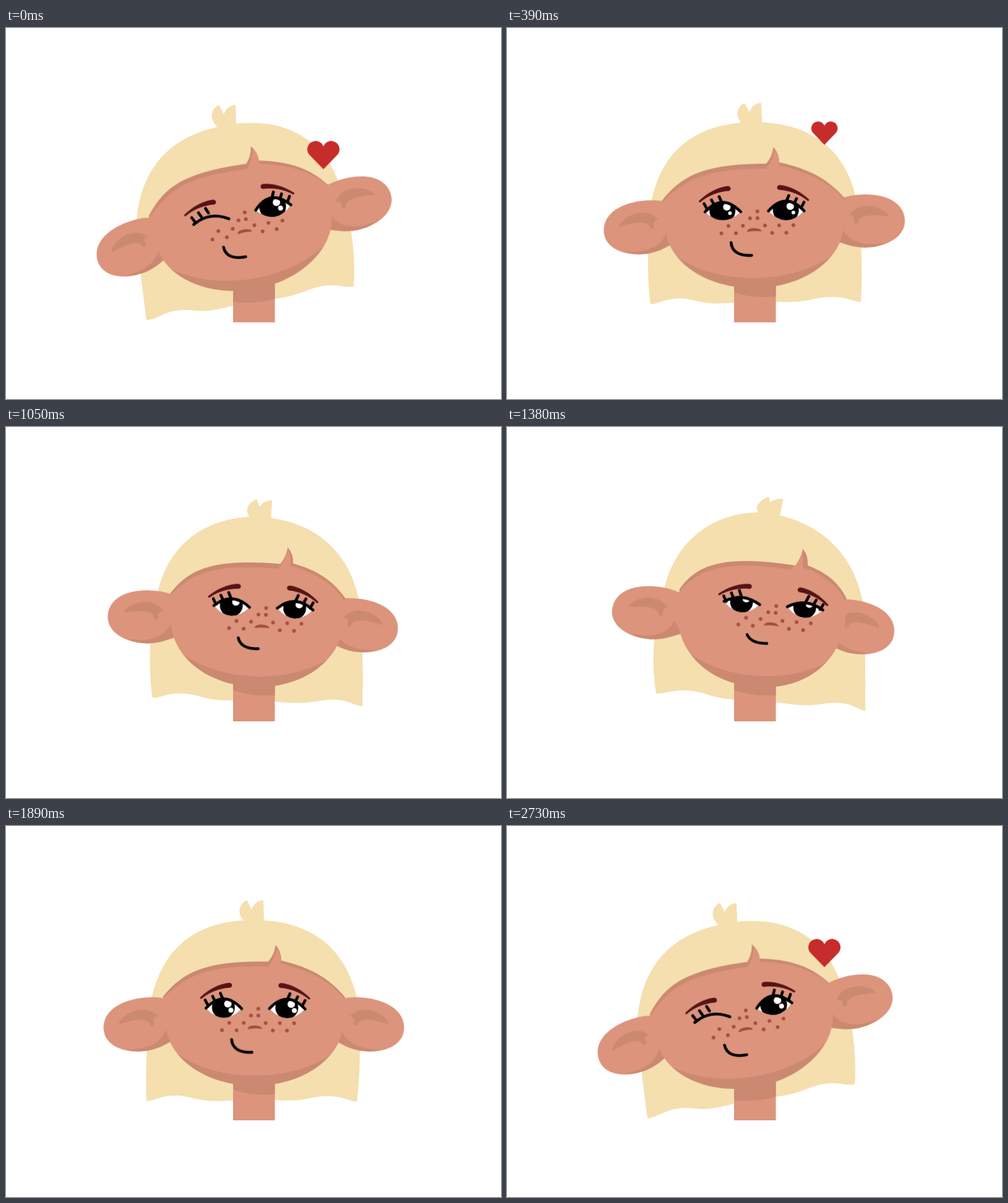
These frames come from a looping animation (800 px wide and 600 px high, 2760 ms). An HTML page:

```html
<!DOCTYPE html>
<html lang="en">
<head>
<meta charset="utf-8">
<title>Winking girl</title>
<style>
html, body { margin: 0; width: 100%; height: 100%; overflow: hidden; background: #fff; }
svg { display: block; width: 100%; height: 100%; }

/* Poses: --w wink, --s hair swing, --r recoil, --n neutral, --t tilt, --u settling */
.shape, .move, .swing, .hair, .dilate, .glint, .heart {
  animation: 2760ms cubic-bezier(.33, 0, .67, 1) infinite;
}
.shape { animation-name: shape; }
.move { animation-name: move; }
.swing { animation-name: swing; }
.hair { animation-name: hair; }
.dilate { animation-name: dilate; }
.glint { animation-name: glint; }
.heart { animation-name: heart; animation-timing-function: linear; }

@keyframes shape {
  0%, 2.7%, 98.91%, 100% { d: var(--w); }
  16.3%, 70.65% { d: var(--n); }
  34.78%, 93.48% { d: var(--n); animation-timing-function: cubic-bezier(.4, .2, .7, .7); }
  40.6%, 56.5% { d: var(--t); }
}
@keyframes move {
  0%, 2.7%, 98.91%, 100% { transform: var(--w); }
  16.3%, 70.65% { transform: var(--n); }
  34.78%, 93.48% { transform: var(--n); animation-timing-function: cubic-bezier(.4, .2, .7, .7); }
  40.6%, 56.5% { transform: var(--t); }
}
@keyframes swing {
  0%, 2.7%, 98.91%, 100% { transform: var(--w); }
  7.61% { transform: var(--r); }
  20%, 34.78%, 82%, 93.48% { transform: var(--n); }
  40.6%, 56.5% { transform: var(--t); }
  68.5% { transform: var(--u); }
}
@keyframes hair {
  0%, 98.91%, 100% { d: var(--w); }
  2.9% { d: var(--s); animation-timing-function: ease-in; }
  7.61% { d: var(--r); animation-timing-function: ease-out; }
  16.3%, 82% { d: var(--n); }
  34.78%, 93.48% { d: var(--n); animation-timing-function: cubic-bezier(.4, .2, .7, .7); }
  40.6%, 56.5% { d: var(--t); }
  68.5% { d: var(--u); }
}
@keyframes dip {
  0%, 16.3%, 100% { translate: 0 0; }
  7.61% { translate: 0 3px; }
}
@keyframes dilate {
  0%, 10%, 92%, 100% { r: 21.7px; }
  24%, 70% { r: 18.5px; }
}
@keyframes glint {
  0%, 10%, 67%, 100% { r: 4px; }
  22%, 57% { r: 0px; }
}
@keyframes heart {
  0%, 98.91%, 100% { transform: translate(513px, 205.5px) scale(.79); }
  4.3% { transform: translate(513px, 195px) scale(1.03); }
  7.61% { transform: translate(513px, 187px) scale(1); }
  26.1% { transform: translate(513px, 139px) scale(.01); }
  26.2% { transform: translate(513px, 139px) scale(0); }
  92.5% { transform: translate(513px, 250px) scale(0); }
  93.48% { transform: translate(513px, 243px) scale(.1); }
}

.mane {
  --n: path("M233 445C226 400 228 320 236 272C255 195 310 152 400 152C490 152 548 195 565 274C573 320 577 395 573 445C552 441 550 436 523 436C495 436 490 446 434 443L367 444C310 448 308 436 280 436C255 436 250 443 233 445Z");
  --u: path("M227 445C225 400 228 320 236 275C255 195 310 152 400 152C490 152 548 195 567 278C573 320 574 395 567 446C546 442 544 437 518 437C490 437 485 447 434 443L367 444C304 448 302 436 275 436C249 436 244 443 227 445Z");
  --w: path("M227 473C222 430 210 350 211 310C219 223 268 172 357 157C445 142 510 176 537 248C556 300 566 360 562 418C548 420 545 416 523 416C490 418 480 433 434 438L367 449C310 464 315 455 285 456C255 458 250 469 227 473Z");
  --s: path("M224 481C219 432 210 350 211 310C219 223 268 172 357 157C445 142 510 176 537 248C557 300 569 360 564 417C548 419 545 416 523 417C490 419 480 435 434 439L367 450C310 467 313 458 283 460C253 463 248 476 224 481Z");
  --r: path("M220 467C220 430 220 350 218 303C226 205 300 156 390 156C465 156 515 175 545 252C562 300 567 360 558 428C535 426 535 423 515 424C485 426 475 440 434 441L367 448C305 462 310 451 275 452C250 453 240 463 220 467Z");
  --t: path("M241 431C234 390 233 330 255 258C272 190 325 141 403 138C490 142 560 195 575 285C580 340 579 400 579 459C565 457 560 446 529 446C500 447 500 455 434 445L367 441C320 437 325 427 284 426C262 426 260 431 241 431Z");
}
.neck-shade {
  --n: path("M367 400L434.5 400L434.5 434Q395 437 367 426Z");
  --w: path("M367 400L434.5 400L434.5 438Q400 447 367 443Z");
  --t: path("M367 400L434.5 400L434.5 434Q395 436 367 425Z");
}
.head {
  transform-origin: 411.5px 319px;
  animation-name: move, dip;
  --n: translate(0, 0) rotate(0deg);
  --w: translate(-16.5px, 1px) rotate(-9.3deg);
  --t: var(--n);
}
.ear { --n: translate(0, 0) rotate(0deg); }
.left-ear {
  transform-origin: 268px 315px;
  --w: translate(0, 0) rotate(-8.2deg); --r: translate(0, 0) rotate(-8deg);
  --t: translate(12.6px, -10px) rotate(8deg); --u: translate(0, 0) rotate(-5deg);
}
.right-ear {
  transform-origin: 533px 315px;
  --w: translate(0, 0) rotate(-7.6deg); --r: translate(0, 0) rotate(-9.5deg);
  --t: translate(-16.7px, 0) rotate(8deg); --u: translate(0, 0) rotate(5deg);
}
.tuft-swing {
  transform-origin: 405px 153px;
  --n: rotate(0deg); --w: rotate(10deg); --r: rotate(0deg); --t: rotate(0deg); --u: rotate(0deg);
}
.tuft {
  --n: path("M386 157C372 146 372 128 387 120.5L395 135.5Q400 121 414 120.5L415.5 156Z");
  --w: var(--n);
  --t: path("M410 141C400 136 400 122 423 112.5L425 122Q434 115 446.5 116.5L441 143Z");
}
.face {
  --n: path("M252 277C282 241 313 218 421 219Q431 208 433 192Q443 204 442 217C490 228 522 246 548 277C547 290 545 304 545 318C545 374 480 420 401 420C321 420 257 374 257 318C257 304 254 290 252 277Z");
  --w: path("M252 277C282 238 312 216 421 219Q431 208 433 192Q443 204 442 217C490 226 522 243 546 274C545 290 544 304 544 318C544 374 479 421 400 421C320 421 256 374 256 318C256 304 254 290 252 277Z");
  --t: path("M279 262C305 225 345 205 466 224Q476 210 478 197Q487 207 486 224C515 235 535 250 548 276C549 290 549 300 547 310C540 375 490 421 416 421C335 421 276 370 276 305C276 290 277 275 279 262Z");
}
.face-light {
  --n: path("M253 279C290 245 316 226 421 227Q432 214 435 197Q443 206 442 222C490 234 522 250 547 279L580 300L545 352C480 421 322 421 257 352L222 300Z");
  --w: path("M253 279C290 242 315 224 421 227Q432 214 435 197Q443 206 442 222C490 232 522 247 546 276L580 300L545 352C480 421 322 421 257 352L222 300Z");
  --t: path("M279 266C306 234 345 213 458 231Q472 218 477 199Q479 212 478 227C510 238 535 256 548 283L580 300L545 360C485 419 345 419 276 350L250 300Z");
}
.features {
  transform-origin: 411.5px 319px;
  --n: translate(0, 0) rotate(0deg);
  --w: var(--n);
  --t: translate(27.2px, -6px) rotate(4.9deg);
}
.mouth {
  --n: path("M363 346C364 360 375 368 396 367");
  --w: var(--n);
  --t: path("M363 346C368 355 378 359 396 357.5");
}
.almond {
  --n: path("M322 296Q350 264 379 296Q350 326 322 296Z");
  --w: var(--n);
  --t: path("M322 296Q350 278 379 296Q350 326 322 296Z");
}
.almond.wink { --w: path("M322 302Q350 285 379 302Q350 285 322 302Z"); }
.lid {
  --n: path("M321.5 295.5Q350 264 379 296");
  --w: var(--n);
  --t: path("M321.5 295.5Q350 278 379 296");
}
.lid.wink { --w: path("M321.5 302Q350 285 379 302"); }
.lashes { --n: translate(0, 0); --w: var(--n); --t: translate(0, 5px); }
.lashes.wink { --w: translate(0, 8.5px); }
.brow {
  transform-origin: 337px 268px;
  --n: translate(0, 0) rotate(0deg);
  --w: translate(0, 1px) rotate(2deg);
  --t: translate(0, 9px) rotate(0deg);
}
.brow.wink { --w: translate(-1.7px, 10.4px) rotate(8.9deg); --t: translate(0, 8.5px) rotate(5deg); }

.blond { fill: #f5dfaf; }
.skin { fill: #dc947c; }
.shade { fill: #cb8971; }
.freckles { fill: #a54f40; }
.brow { fill: #561416; }
.white { fill: #fff; }
.line { fill: none; stroke: #000; stroke-width: 4.6; stroke-linecap: round; stroke-linejoin: round; }
</style>
</head>
<body>
<svg viewBox="0 0 800 600">
  <defs>
    <clipPath id="face-clip"><path class="shape face"/></clipPath>
    <clipPath id="wink-clip"><path class="shape almond wink"/></clipPath>
    <clipPath id="open-clip"><path class="shape almond"/></clipPath>
    <g id="ear">
      <path class="skin" d="M270 282C240 266 157 270 157 320C157 345 185 360 217 360C240 360 255 352 270 345Z"/>
      <path class="shade" d="M188 354C215 359 250 353 259 325L275 343C255 352 240 360 217 360Q201 360 188 354Z"/>
      <path class="shade" d="M183 310C195 293 230 284 246 306C240 306 237 309 239 318C236 322 232 320 231 314C222 305 200 310 187 312C183 314 182 312 183 310Z"/>
    </g>
    <path id="lashes" class="line" d="M320 282L324.5 290.5M332 276L336 284M344.5 271L348 279"/>
    <path id="brow" d="M312 277.5C325 265 342 255 359 253.5C364.5 254 364.5 261 360 261.5C344 262.5 328 268 314 280Q311 280 312 277.5Z"/>
  </defs>

  <path class="hair mane blond"/>
  <rect class="skin" x="367" y="395" width="67.5" height="81"/>
  <path class="shape neck-shade shade"/>

  <g class="move head">
    <g class="swing ear left-ear"><use href="#ear"/></g>
    <g class="swing ear right-ear"><use href="#ear" transform="matrix(-1 0 0 1 801 0)"/></g>
    <g class="swing tuft-swing"><path class="shape tuft blond"/></g>
    <g clip-path="url(#face-clip)">
      <rect class="shade" x="200" y="150" width="400" height="300"/>
      <path class="shape face-light skin"/>
    </g>

    <g class="move features">
      <g class="freckles" id="freckles">
        <path fill="#a44d42" d="M389 328Q390 323 401 323Q412 323.5 412.5 328.5Q401 327 390 329Q388.5 329 389 328Z"/>
      </g>
      <path class="shape mouth line"/>

      <g clip-path="url(#wink-clip)">
        <rect class="white" x="315" y="260" width="70" height="60"/>
        <circle class="dilate" cx="349.5" cy="294" r="18.5"/>
        <circle class="white" cx="356.7" cy="288.3" r="6"/>
        <circle class="glint white" cx="361.7" cy="298.5" r="4"/>
      </g>
      <path class="shape lid wink line"/>
      <g class="move lashes wink"><use href="#lashes"/></g>
      <g class="move brow wink"><use href="#brow"/></g>

      <g transform="translate(102.5 0)">
        <g clip-path="url(#open-clip)">
          <rect class="white" x="315" y="260" width="70" height="60"/>
          <circle class="dilate" cx="349.5" cy="294" r="18.5"/>
          <circle class="white" cx="356.7" cy="288.3" r="6"/>
          <circle class="glint white" cx="361.7" cy="298.5" r="4"/>
        </g>
        <path class="shape lid line"/>
      </g>
      <g transform="matrix(-1 0 0 1 801.5 0)">
        <g class="move lashes"><use href="#lashes"/></g>
        <g class="move brow"><use href="#brow"/></g>
      </g>
    </g>
  </g>

  <path class="heart" fill="#c62c2b" d="M0 29L-28 0A17 17 0 1 1 0 -18A17 17 0 1 1 28 0Z"/>
</svg>
<script>
const rows = [[296, 406], [307, 394, 406], [319, 359, 382.5, 418, 441, 464], [331, 347.5, 371, 429.5, 452.5]];
const freckles = document.getElementById("freckles");
for (const [y, ...xs] of rows) {
  for (const x of xs) {
    const dot = document.createElementNS("http://www.w3.org/2000/svg", "circle");
    dot.setAttribute("cx", x);
    dot.setAttribute("cy", y);
    dot.setAttribute("r", 3);
    freckles.append(dot);
  }
}
</script>
</body>
</html>
```
